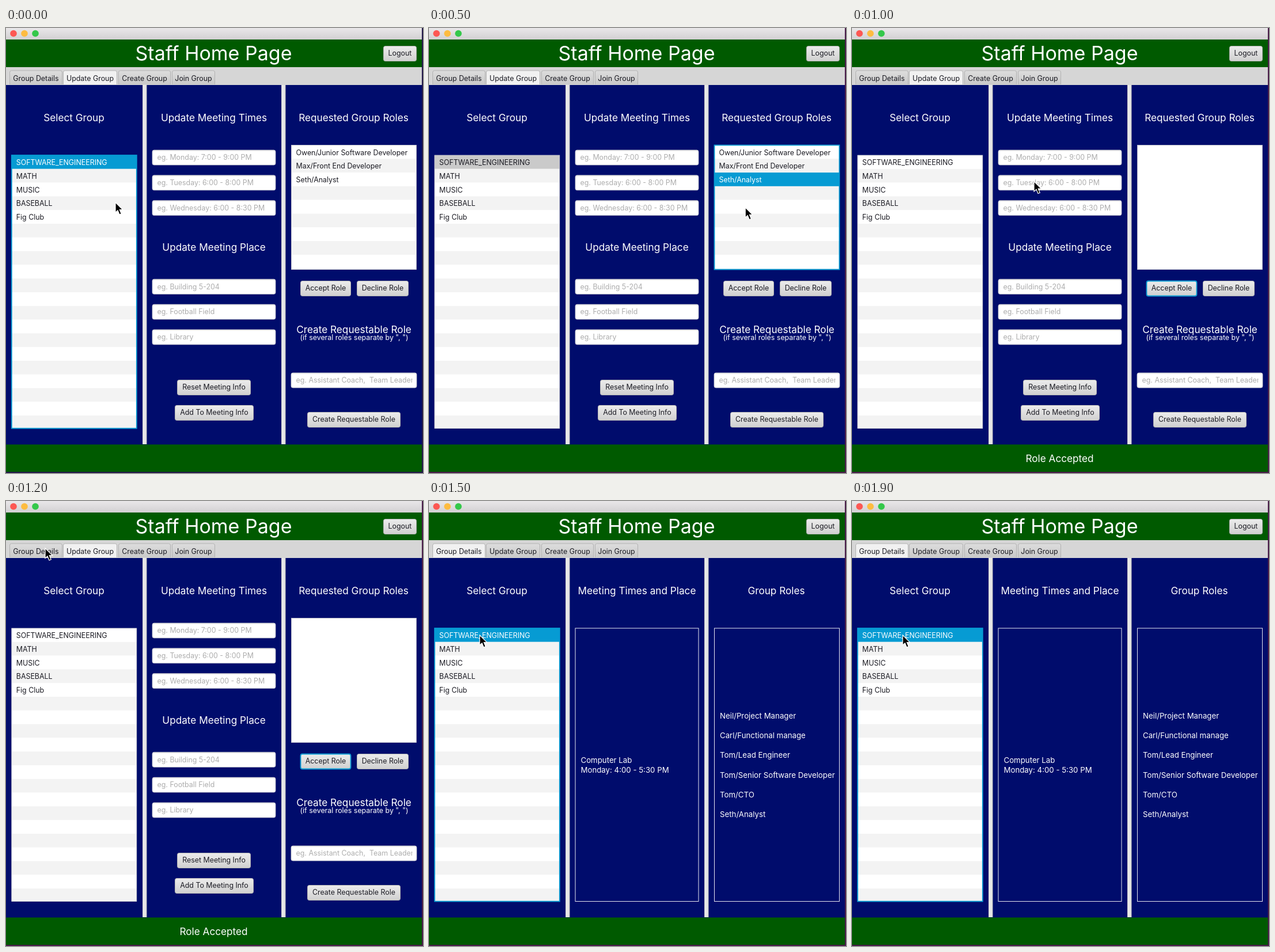
Write an HTML page that moves like this. It is 724 px wide and 773 px high and loops after 2000 ms.

```html
<!DOCTYPE html>
<html lang="en">
<head>
<meta charset="utf-8">
<title>Staff Home Page</title>
<style>
html, body { margin: 0; width: 100%; height: 100%; overflow: hidden; background: #000c6c; }
svg { display: block; width: 100vw; height: 100vh; }
text { font: 12.4px Inter, "Open Sans", sans-serif; fill: #1c1c24; white-space: pre; }
text.title { font-size: 34px; fill: #fff; }
text.head { font-size: 17.2px; fill: #fff; }
text.note { fill: #fff; }
text.body { font-size: 13.25px; fill: #fff; }
text.hint { fill: #adadad; }
text.on { fill: #fff; }
text.mid { text-anchor: middle; }
</style>
</head>
<body>
<svg viewBox="0 0 724 773">
  <defs>
    <linearGradient id="bar" x2="0" y2="1"><stop stop-color="#e9e7e9"/><stop offset="1" stop-color="#d2d0d2"/></linearGradient>
    <linearGradient id="btn" x2="0" y2="1"><stop stop-color="#ececec"/><stop offset="1" stop-color="#d0d0d0"/></linearGradient>
    <linearGradient id="hover" x2="0" y2="1"><stop stop-color="#f5f5f5"/><stop offset="1" stop-color="#dcdcdc"/></linearGradient>
    <linearGradient id="tab" x2="0" y2="1"><stop stop-color="#dddddd"/><stop offset="1" stop-color="#c9c9c9"/></linearGradient>
    <linearGradient id="split"><stop stop-color="#c4c4c4"/><stop offset=".25" stop-color="#ececec"/><stop offset=".75" stop-color="#e4e4e4"/><stop offset="1" stop-color="#c0c0c0"/></linearGradient>
    <clipPath id="field"><rect x="496" y="599" width="209.5" height="26"/></clipPath>
  </defs>
  <g id="view"></g>
  <path id="cursor" d="M0 0V17.5L4 13.8L7 21L10.2 19.7L7.3 12.7H12.6Z" fill="#000" stroke="#fff" stroke-width="1.2"/>
</svg>
<script>
const STEP = 100, STEPS = 20, ROW = 23.8;
const BLUE = '#069bd3';
const SELECT = 4, ACCEPT = 8, DETAILS = 13, CHOOSE = 15;

const groups = ['SOFTWARE_ENGINEERING', 'MATH', 'MUSIC', 'BASEBALL', 'Fig Club'];
const requests = ['Owen/Junior Software Developer', 'Max/Front End Developer', 'Seth/Analyst'];
const members = ['Neil/Project Manager', 'Carl/Functional manage', 'Tom/Lead Engineer',
  'Tom/Senior Software Developer', 'Tom/CTO', 'Seth/Analyst'];
const tabs = [['Group Details', 6, 98], ['Update Group', 99, 193], ['Create Group', 195, 286], ['Join Group', 288, 363]];

// step, x, y of the pointer tip
const path = [[0, 190, 303], [3, 539, 280], [4, 544, 263], [7, 564, 451], [8, 564, 451],
  [12, 68, 82], [13, 68, 82], [15, 88, 233], [20, 88, 233]];

const view = document.getElementById('view');
const cursor = document.getElementById('cursor');

const rect = (x, y, w, h, fill, more = '') =>
  `<rect x="${x}" y="${y}" width="${w}" height="${h}" fill="${fill}" ${more}/>`;
const text = (s, x, y, cls = '', more = '') => `<text x="${x}" y="${y}" class="${cls}" ${more}>${s}</text>`;
const head = (s, x, y) => text(s, x, y, 'head mid');

function button(s, x, y, w, fill = 'btn', focus = false) {
  const edge = focus ? `stroke="${BLUE}" stroke-width="1.8"` : 'stroke="#b2b2b2"';
  return rect(x + .5, y + .5, w - 1, 26, `url(#${fill})`, `rx="3" ${edge}`) +
    text(s, x + w / 2, y + 17.3, 'mid');
}

function input(s, x, y, w, more = '') {
  return rect(x, y, w, 26, '#fff', 'rx="3" stroke="#bcbcc6" stroke-width=".8"') +
    `<path d="M${x + 2} ${y + 1}h${w - 4}" stroke="#d9d9d9"/>` +
    text(s, x + 8.5, y + 17.3, 'hint', more);
}

function list(items, x, y, w, h, { picked = -1, focus = false, striped = true } = {}) {
  let out = rect(x, y, w, h, '#fff');
  for (let i = 0; striped && i * ROW < h; i++) {
    const fill = i === picked ? (focus ? BLUE : '#cacaca') : i % 2 ? '#f3f3f3' : '#fff';
    out += rect(x, y + i * ROW, w, Math.min(ROW, h - i * ROW), fill);
  }
  items.forEach((s, i) => {
    out += text(s, x + 8, y + i * ROW + 17, i === picked && focus ? 'on' : '');
  });
  return out + rect(x, y, w, h, 'none', focus ? `stroke="${BLUE}" stroke-width="1.8"` : 'stroke="#bfbfc8" stroke-width=".8"');
}

function tabBar(active, focus) {
  return rect(0, 68, 722, 31, '#d6d6d6') + tabs.map(([s, a, b], i) => {
    const on = i === active;
    const edge = on && focus ? BLUE : '#b2b2b2';
    return `<path d="M${a + .5} 98V77q0-3 3-3H${b - 3.5}q3 0 3 3V98" fill="${on ? '#f1f1f1' : 'url(#tab)'}" stroke="${edge}"/>` +
      text(s, (a + b) / 2, 91.5, 'mid');
  }).join('');
}

function frame(n) {
  const lights = ['#fc5753', '#fdbc40', '#34c84a'];
  return rect(0, 0, 724, 773, n < 5 ? '#221848' : '#481c48') +
    rect(0, 0, 722, 771, '#000c6c') +
    rect(0, 0, 722, 20, 'url(#bar)') +
    lights.map((c, i) => `<circle cx="${13 + 19 * i}" cy="9.5" r="5.8" fill="${c}"/>`).join('') +
    rect(0, 20, 722, 48, '#005a00') + text('Staff Home Page', 360.5, 56, 'title mid') +
    button('Logout', 655, 31, 58) +
    tabBar(n < DETAILS ? 1 : 0, n >= DETAILS && n < CHOOSE) +
    rect(237, 99, 7.5, 624, 'url(#split)') + rect(478, 99, 7.5, 624, 'url(#split)') +
    rect(0, 723.5, 722, 47.5, '#005a00') +
    (n >= ACCEPT && n < CHOOSE ? head('Role Accepted', 360.5, 754) : '');
}

function updatePage(n) {
  const done = n >= ACCEPT;
  const times = ['Monday: 7:00 - 9:00 PM', 'Tuesday: 6:00 - 8:00 PM', 'Wednesday: 6:00 - 8:30 PM'];
  const places = ['Building 5-204', 'Football Field', 'Library'];
  const fields = (all, y) => all.map((s, i) => input('eg. ' + s, 254, y + 43.8 * i, 214)).join('');
  return head('Update Meeting Times', 361, 162) + fields(times, 212) +
    head('Update Meeting Place', 361, 387) + fields(places, 436.3) +
    button('Reset Meeting Info', 297, 611, 128) + button('Add To Meeting Info', 293, 655, 137) +
    head('Requested Group Roles', 603.5, 162) +
    list(done ? [] : requests, 495.5, 203.5, 217, 216,
      { picked: n >= SELECT ? 2 : -1, focus: n >= SELECT && !done, striped: !done }) +
    button('Accept Role', 511, 439, 88, n > 6 && n < 9 ? 'hover' : 'btn', done) +
    button('Decline Role', 609, 439, 90) +
    head('Create Requestable Role', 604, 530) +
    text('(if several roles separate by ", ")', 604.5, 542, 'note mid') +
    input('eg. Assistant Coach,  Team Leader', 495, 599, 218, 'clip-path="url(#field)"') +
    button('Create Requestable Role', 523, 667, 162);
}

function detailsPage(n) {
  const box = (x, w) => rect(x, 221, w, 474.5, 'none', 'stroke="#e6e6f0"');
  let out = head('Meeting Times and Place', 361, 162) + head('Group Roles', 603, 162) +
    box(254, 214) + box(495.5, 217);
  if (n >= CHOOSE) {
    out += text('Computer Lab', 263.5, 455, 'body') + text('Monday: 4:00 - 5:30 PM', 263.5, 472, 'body') +
      members.map((s, i) => text(s, 505, 378 + 34.2 * i, 'body')).join('');
  }
  return out;
}

function pointer(n) {
  const i = path.findIndex(p => p[0] > n);
  const [a, x, y] = path[i - 1], [b, u, v] = path[i];
  const k = (n - a) / (b - a), e = k * k * (3 - 2 * k);
  return `translate(${x + (u - x) * e} ${y + (v - y) * e})`;
}

function draw(n) {
  const focus = n < SELECT || n >= CHOOSE;
  const picked = n < ACCEPT || n >= CHOOSE ? 0 : -1;
  view.innerHTML = frame(n) + head('Select Group', 118, 162) +
    list(groups, 9.8, 221, 217, 474.5, { picked, focus }) +
    (n < DETAILS ? updatePage(n) : detailsPage(n));
  cursor.setAttribute('transform', pointer(n));
}

const start = performance.now();
let last = -1;
function tick() {
  const n = Math.floor((performance.now() - start) / STEP) % STEPS;
  if (n !== last) draw(last = n);
  requestAnimationFrame(tick);
}
tick();
</script>
</body>
</html>
```
